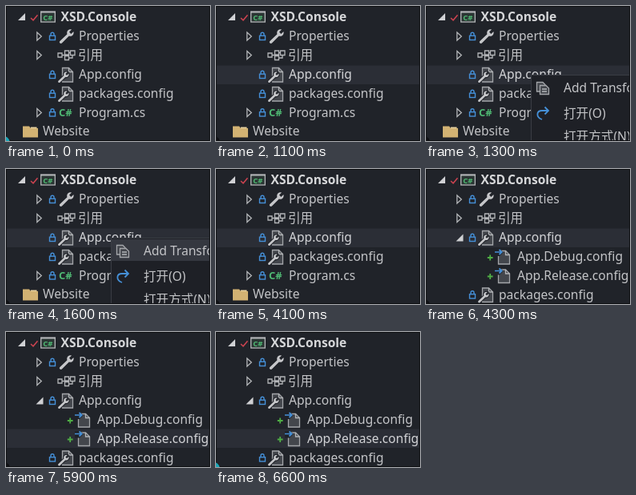
An HTML page for the animation above (6700 ms loop, 255 by 169 pixels).

```html
<!DOCTYPE html>
<html lang="en">
<head>
<meta charset="utf-8">
<title>Solution tree</title>
<style>
html, body { margin: 0; width: 100%; height: 100%; overflow: hidden; background: #202329; }
svg { display: block; width: 100vw; height: 100vh; }
text { font: 15.6px "Noto Sans", "Noto Sans CJK SC", sans-serif; fill: #c3c4c7; }
.bold { font-weight: 700; fill: #d6d7d9; }
.on text { fill: #d2d3d6; }
.cs { font: 700 13px "Noto Sans", sans-serif; fill: #4fb873; }
.line { fill: none; stroke: #b4b6b9; stroke-width: 1.3; }
.page { fill: #43464c; stroke: #a4a6aa; stroke-width: 1.3; }
</style>
</head>
<body>
<svg viewBox="0 0 255 169" preserveAspectRatio="none">
  <defs>
    <path id="closed" class="line" d="M38.8 -5V5L44.3 0Z"/>
    <path id="open" d="M46.5 -4.5V4.5H37.5Z" fill="#d0d1d4"/>
    <g id="lock" fill="none" stroke="#4590d8" stroke-width="1.4">
      <path d="M56 -1V-2.8a2 2 0 0 1 4 0V-1"/>
      <rect x="54.5" y="-.8" width="7" height="5.3"/>
    </g>
    <path id="wrench" d="M-8 6L1.2 -2.8C-.1 -6.7 3.2 -9.7 6.7 -8.6L3.7 -5.5L6 -3.1L9.1 -6.1C10.1 -2.5 7.1 .7 3.5 -.4L-5.5 8.5C-7.4 9.7 -9.4 7.8 -8 6Z" fill="#c6c7ca"/>
    <g id="config">
      <path class="page" d="M70.5 -8.5H78.5L83.5 -3.5V9H70.5Z"/>
      <path class="line" d="M78.5 -8.5V-3.5H83.5"/>
      <use href="#wrench" transform="translate(71.5 3.2) scale(.76)" stroke="#202329" stroke-width="3" paint-order="stroke"/>
    </g>
    <g id="transform">
      <path class="page" d="M90.5 -7.5H99.5L104.5 -2.5V9H90.5Z"/>
      <path class="line" d="M99.5 -7.5V-2.5H104.5"/>
      <path d="M86 -9.5H92L96.8 -6L92 -1H86Z" fill="#202329"/>
      <path d="M86 -6H94.5M91.5 -9L94.8 -6L91.5 -3" fill="none" stroke="#4590d8" stroke-width="1.7"/>
    </g>
    <path id="plus" d="M76.8 1H83.6M80.2 -2.4V4.4" stroke="#4fae45" stroke-width="1.8"/>
  </defs>

  <rect width="255" height="169" fill="#202329"/>
  <rect id="bar" width="255" height="23.5" fill="#2b2e36"/>

  <g transform="translate(0 14)">
    <path d="M24 -5V4H15Z" fill="#d0d1d4"/>
    <path d="M31 1L34 3.8L39.5 -2.8" fill="none" stroke="#cc4350" stroke-width="1.5"/>
    <rect x="43.7" y="-6.6" width="17.6" height="12.6" class="line" style="fill:#2b3634"/>
    <path d="M43 -6.5H62" stroke="#b4b6b9" stroke-width="2"/>
    <text x="46.3" y="4.2" class="cs" style="font-size:9.5px">C#</text>
    <text x="68.5" y="5" class="bold">XSD.Console</text>
  </g>
  <g transform="translate(0 38)">
    <use href="#closed"/><use href="#lock"/>
    <use href="#wrench" x="75.3"/>
    <text x="91" y="5">Properties</text>
  </g>
  <g transform="translate(0 61.5)">
    <use href="#closed"/>
    <path class="line" d="M65 -2.5H70V2.5H65ZM70 0H73M73.5 1H78.5V6H73.5ZM73.5 -5.5H78.5V-.5H73.5ZM78.5 -3H80.5M80.5 -5.5H86V0H80.5ZM83 0V3.5H78.5"/>
    <text x="90" y="5">引用</text>
  </g>

  <g id="app" transform="translate(0 86)">
    <use id="arrow" href="#open"/><use href="#lock"/><use href="#config"/>
    <text x="91" y="5">App.config</text>
  </g>

  <g id="folded">
    <g transform="translate(0 110)">
      <use href="#lock"/><use href="#config"/>
      <text x="91" y="5">packages.config</text>
    </g>
    <g transform="translate(0 133.5)">
      <use href="#closed"/><use href="#lock"/>
      <text x="66" y="4.8" class="cs">C#</text>
      <text x="91" y="5">Program.cs</text>
    </g>
    <g transform="translate(0 157.5)">
      <path d="M21 -7H29L31 -4.5H40V7H21Z" fill="#d2b273"/>
      <path d="M31 -5.2H38.5" stroke="#e8d3a2" stroke-width="1.5"/>
      <text x="46" y="4.7">Website</text>
    </g>
  </g>

  <g id="expanded">
    <g id="debug" transform="translate(0 110)">
      <use class="plus" href="#plus"/><use href="#transform"/>
      <text x="114" y="5">App.Debug.config</text>
    </g>
    <g id="release" transform="translate(0 133.5)">
      <use class="plus" href="#plus"/><use href="#transform"/>
      <text x="114" y="5">App.Release.config</text>
    </g>
    <g transform="translate(0 157.5)">
      <use href="#lock"/><use href="#config"/>
      <text x="91" y="5">packages.config</text>
    </g>
  </g>

  <g id="menu">
    <rect x="131.5" y="86.5" width="130" height="90" fill="#1e2026" stroke="#3a3d44"/>
    <rect id="hover" x="132" y="88" width="123" height="27" fill="#353840"/>
    <path class="page" d="M138.5 95.5H146L149 98.5V107H138.5Z"/>
    <path class="page" d="M142.5 99.5H150L153.5 103V110.5H142.5Z"/>
    <path class="line" d="M145 104H151M145 107H151"/>
    <path d="M145 142C137 139 138 131 145 131H152M148.5 126.5L153 131L148.5 135.5" fill="none" stroke="#4590d8" stroke-width="1.8"/>
    <text x="172" y="108">Add Transform</text>
    <text x="172" y="140">打开(O)</text>
    <text x="172" y="168.5">打开方式(N)</text>
  </g>

  <path d="M0 .5H255M254.5 0V169M0 168.5H255M.5 0V169" stroke="#0f1013"/>
  <path d="M0 163Q3.5 165 5 169H0Z" fill="#0f1013"/>
  <path id="corner" d="M0 163.5Q3.5 165 4.5 169H0Z" fill="#1aa7b8"/>
</svg>
<script>
const LOOP = 6700;
// start time, selected row, visible parts
const steps = [
  [0, "", "folded corner"],
  [1100, "app", "folded"],
  [1300, "app", "folded menu"],
  [1600, "app", "folded menu hover"],
  [4100, "app", "folded"],
  [4200, "app", "expanded arrow"],
  [4300, "app", "expanded arrow plus"],
  [5500, "debug", "expanded arrow plus"],
  [5900, "release", "expanded arrow plus"],
  [6600, "release", "expanded arrow plus corner"]
];
const rowTop = { app: 74.5, debug: 97.5, release: 121.5 };
const parts = ["folded", "expanded", "arrow", "menu", "hover", "corner"];
const el = id => document.getElementById(id);
const show = (node, on) => { node.style.display = on ? "" : "none"; };
let current;

function apply([, row, list]) {
  const visible = list.split(" ");
  for (const id of parts) show(el(id), visible.includes(id));
  for (const node of document.querySelectorAll(".plus")) show(node, visible.includes("plus"));
  for (const id in rowTop) el(id).classList.toggle("on", id === row);
  show(el("bar"), row);
  if (row) el("bar").setAttribute("y", rowTop[row]);
}

const start = performance.now();
function tick() {
  const t = (performance.now() - start) % LOOP;
  const step = steps.findLast(s => s[0] <= t);
  if (step !== current) apply(current = step);
  requestAnimationFrame(tick);
}
tick();
</script>
</body>
</html>
```
